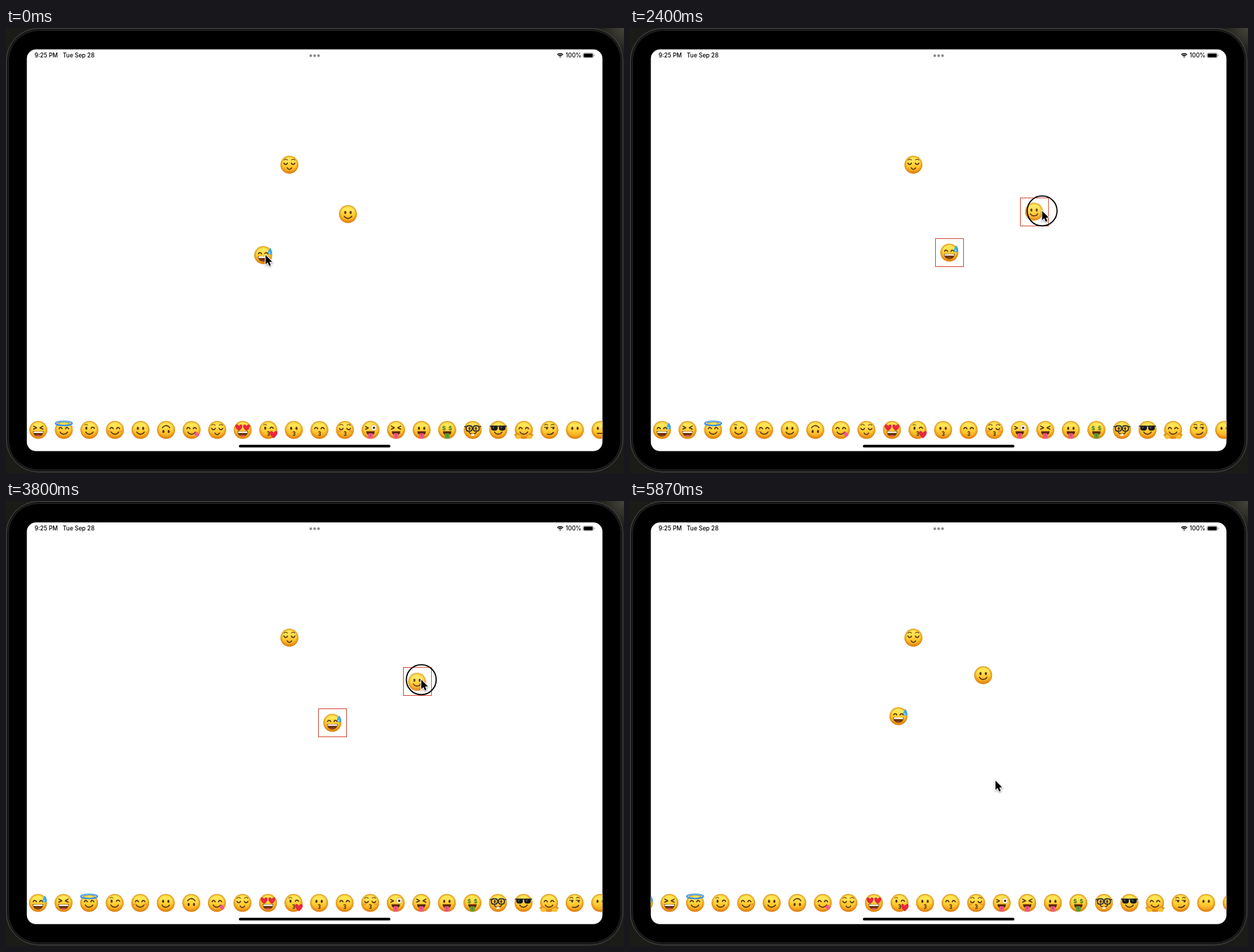
An HTML page with a canvas for the animation above (5940 ms loop, 881 by 635 pixels).

```html
<!DOCTYPE html>
<html lang="en">
<head>
<meta charset="utf-8">
<title>Emoji board</title>
<style>
html, body { margin: 0; width: 100%; height: 100%; overflow: hidden; background: #1b1b18; }
canvas { display: block; width: 881px; height: 635px; }
</style>
</head>
<body>
<canvas id="stage"></canvas>
<script>
const W = 881, H = 635, LOOP = 5940, STEP = 200 / 3;
const canvas = document.getElementById('stage');
const dpr = window.devicePixelRatio || 1;
canvas.width = W * dpr;
canvas.height = H * dpr;
const c = canvas.getContext('2d');
const PI = Math.PI, TAU = PI * 2;
const BROWN = '#5a2f08', BROW = '#7a430c', PINK = '#f2598f', RED = '#e8283c';

// ---------- drawing helpers ----------
function fill(color) { c.fillStyle = color; c.fill(); }
function stroke(color, width) { c.strokeStyle = color; c.lineWidth = width; c.stroke(); }
function oval(x, y, rx, ry, color) {
  c.beginPath();
  c.ellipse(x, y, rx, ry, 0, 0, TAU);
  fill(color);
}
function bow(x, y, r, from, to, width = 1.2, color = BROWN) {
  c.beginPath();
  c.arc(x, y, r, from * PI, to * PI);
  stroke(color, width);
}
function poly(points, color, width) {
  c.beginPath();
  points.forEach(([x, y]) => c.lineTo(x, y));
  if (width) stroke(color, width);
  else { c.closePath(); fill(color); }
}
function round(x, y, w, h, r) {
  c.beginPath();
  c.roundRect(x, y, w, h, r);
}
function at(x, y, scale, draw) {
  c.save();
  c.translate(x, y);
  c.scale(scale, scale);
  draw();
  c.restore();
}
function heart(x, y, s) {
  at(x, y, s, () => {
    c.beginPath();
    c.moveTo(0, 1);
    c.bezierCurveTo(-1.6, -0.1, -1.1, -1.3, -0.5, -1);
    c.quadraticCurveTo(-0.1, -0.9, 0, -0.5);
    c.quadraticCurveTo(0.1, -0.9, 0.5, -1);
    c.bezierCurveTo(1.1, -1.3, 1.6, -0.1, 0, 1);
    fill(RED);
  });
}

// ---------- face parts, for a head of radius 10 ----------
function head() {
  const g = c.createLinearGradient(0, -10, 0, 10);
  g.addColorStop(0, '#fde04a');
  g.addColorStop(0.25, '#ffe758');
  g.addColorStop(0.6, '#ffc92f');
  g.addColorStop(1, '#f2961a');
  oval(0, 0, 10, 10, g);
  const rim = c.createRadialGradient(0, -0.8, 7, 0, 0, 10);
  rim.addColorStop(0, 'rgba(214,118,10,0)');
  rim.addColorStop(1, 'rgba(206,112,10,.7)');
  oval(0, 0, 10, 10, rim);
}
const pair = draw => () => { draw(-3.6); draw(3.6); };
const dots = pair(x => oval(x * 0.83, -1.8, 1.15, 1.75, BROWN));
const happy = pair(x => bow(x, -0.8, 1.8, 1.08, 1.92));
const closed = pair(x => {
  bow(x * 1.15, -2.4, 2.1, 0.1, 0.9);
  bow(x * 1.15, -3.6, 2.5, 1.22, 1.78, 0.9, BROW);
});
const squint = pair(x => {
  const s = Math.sign(x);
  poly([[x + s * 1.7, -4.2], [x - s * 1.7, -2.4], [x + s * 1.7, -0.8]], BROWN, 1.2);
});
function wink() {
  oval(-3.4, -1.9, 1.15, 1.75, BROWN);
  bow(3.8, -1.2, 1.9, 1.1, 1.9);
  bow(-3.6, -4.1, 2, 1.2, 1.8, 0.8, BROW);
}
const heartEyes = pair(x => heart(x * 1.2, -2.4, 3.6));
const sideEyes = pair(x => {
  oval(x + 0.3, -1.9, 1.8, 1.1, '#fff0c4');
  oval(x + 0.8, -1.8, 1.1, 1.2, BROWN);
  poly([[x - 1.9, -2.9], [x + 2.1, -2.9]], BROWN, 1);
  bow(x, -3.4, 2.6, 1.25, 1.75, 0.8, BROW);
});
function wildEyes() {
  poly([[-5.6, -3.8], [-2.5, -2.2], [-5.5, -0.8]], BROWN, 1.2);
  oval(3.8, -2.4, 3.2, 3.2, '#ffffff');
  oval(3.8, -2.4, 1.4, 1.4, BROWN);
  bow(3.8, -2.4, 3.2, 0, 2, 0.5, '#c98a20');
}
const moneyEyes = pair(x => {
  c.fillStyle = '#3c7d1e';
  c.font = '700 6.4px Inter, Arial, sans-serif';
  c.textAlign = 'center';
  c.fillText('$', x, 0.2);
});
function glasses() {
  pair(x => {
    oval(x, -1.6, 1.2, 1.7, BROWN);
    round(x * 1.08 - 3.3, -4.6, 6.6, 6, 2.4);
    stroke('#2c2b30', 1.3);
  })();
  poly([[-9, -3.8], [-7, -3.4]], '#2c2b30', 1.1);
  poly([[9, -3.8], [7, -3.4]], '#2c2b30', 1.1);
}
function shades() {
  pair(x => {
    round(x * 1.22 - 3.7, -4.6, 7.4, 5.4, [1, 1, 3, 3]);
    fill('#17181c');
    poly([[x * 1.22 - 2, -3.5], [x * 1.22 + 0.4, -3.5], [x * 1.22 - 1, -1]], '#50545c');
  })();
  poly([[-9.3, -4.3], [9.3, -4.3]], '#17181c', 1);
}

const smile = () => bow(0, 0.1, 4.7, 0.16, 0.84);
const small = () => bow(0, 2.5, 2.7, 0.13, 0.87);
const kiss = () => {
  bow(0.1, 3.1, 1.1, 1.2, 2.5, 0.9);
  bow(0.1, 5.2, 1.1, 1.5, 2.8, 0.9);
};
const line = () => poly([[-3.5, 4], [3.5, 4]], BROWN, 1.2);
const smirkLip = () => {
  c.beginPath();
  c.moveTo(-2.4, 4.8);
  c.quadraticCurveTo(2.4, 5.8, 4.6, 2.8);
  stroke(BROWN, 1.2);
};
function open(lower) {
  c.save();
  c.beginPath();
  c.moveTo(-6, 1.2);
  c.quadraticCurveTo(0, 2, 6, 1.2);
  c.bezierCurveTo(6, 9.4, -6, 9.4, -6, 1.2);
  c.closePath();
  fill('#6b3208');
  c.clip();
  if (lower) oval(0, 8, 3.4, 2.4, lower);
  c.fillStyle = '#ffffff';
  c.fillRect(-5.3, 1.7, 10.6, 1.7);
  c.restore();
}
const laugh = () => open('#e8556a');
const grin = () => open('#8d4a12');
function tongue(color = PINK) {
  c.beginPath();
  c.arc(0, 1.6, 4.8, 0, PI);
  fill('#5d2508');
  round(-2.7, 3.7, 5.4, 6.2, [1.5, 1.5, 2.7, 2.7]);
  fill(color);
  poly([[0, 4.5], [0, 7.4]], 'rgba(90,20,40,.45)', 0.6);
}
const greenTongue = () => tongue('#55a532');

function drop() {
  c.beginPath();
  c.moveTo(7.8, -8.2);
  c.bezierCurveTo(11.4, -2.6, 10.3, -0.4, 7.6, -0.5);
  c.bezierCurveTo(4.2, -0.6, 4.4, -3.4, 7.8, -8.2);
  fill('#3ea6e6');
  oval(7, -2.3, 0.8, 1.1, '#a9dcfa');
}
function halo() {
  c.beginPath();
  c.ellipse(0, -7.2, 9.2, 2.3, 0, 0, TAU);
  stroke('#3d8ede', 1.7);
  c.beginPath();
  c.ellipse(0, -7.6, 9, 2, 0, 1.1 * PI, 1.9 * PI);
  stroke('#86c3f5', 0.7);
}
const blush = pair(x => oval(x * 1.75, 1.6, 2, 1.4, 'rgba(240,95,60,.4)'));
function lick() {
  at(4.8, 3.8, 1, () => {
    c.rotate(-0.7);
    round(-2.1, -1.2, 4.2, 5.4, 2);
    fill(PINK);
  });
}
const blownHeart = () => heart(6, 5.4, 4);
const teeth = () => {
  c.fillStyle = '#ffffff';
  c.fillRect(-1.7, 4.6, 3.4, 2);
};
function hands() {
  [-1, 1].forEach(s => {
    for (let i = 0; i < 4; i++) {
      const a = -0.5 + i * 0.42;
      poly([[s * 6.2, 8], [s * (6.2 - 4 * Math.sin(a - 0.6)), 8.2 - 3.6 * Math.cos(a - 0.3)]], '#e39a22', 1.8);
    }
    oval(s * 6.4, 7.6, 3.2, 2.6, '#f9bf35');
    bow(s * 6.4, 7.6, 2.9, 1.1, 1.9, 0.6, '#c87814');
  });
}

// eyes, mouth, extras; order as in the tray
const faces = [
  [happy, grin, drop], [squint, laugh], [happy, smile, halo], [wink, smile],
  [happy, smile, blush], [dots, smile], [dots, smile], [happy, smile, lick],
  [closed, small], [heartEyes, laugh], [wink, kiss, blownHeart], [dots, kiss],
  [happy, kiss], [closed, kiss, blush], [wildEyes, tongue], [squint, tongue],
  [dots, tongue], [moneyEyes, greenTongue], [glasses, smile, teeth], [shades, smile],
  [happy, smile, hands], [sideEyes, smirkLip], [dots], [dots, line]
];
const SWEAT = 0, SLIGHT = 5, FLIPPED = 6, RELIEVED = 8;

function face(id, x, y) {
  at(x, y, 1.275, () => {
    c.lineCap = c.lineJoin = 'round';
    head();
    if (id === FLIPPED) c.rotate(PI);
    faces[id].forEach(part => part());
  });
}

// ---------- motion ----------
// time, pointer x, pointer y, grip offset x, grip offset y
const path = [
  [0, 370, 324, 2, 2], [300, 370, 324, 2, 2], [667, 484, 285, 2, 2],
  [950, 490, 268, 2.5, 2.5], [1780, 490, 268, 2.5, 2.5], [2080, 525, 278, 8, 4],
  [2400, 587.5, 261, 11.5, -1], [2660, 642, 190, 6, -3], [2850, 575, 150, 1, 1],
  [3030, 465, 190, 0, 8], [3267, 384.5, 325.5, 9.5, 11.5], [3530, 490, 392, 12, 4],
  [3800, 592, 255, 6, -3], [4050, 505, 146, 1, 3], [4333, 398, 298, 6, 7],
  [4600, 440, 348, 8, 5], [4900, 512, 255, 8.5, 6.5], [5040, 512, 255, 8.5, 6.5],
  [5400, 535, 377, 8.5, 6.5], [5530, 521, 399, 8.5, 6.5], [5940, 521, 399, 8.5, 6.5]
];
function slope(i, k) {
  const a = path[i - 1], b = path[i], d = path[i + 1];
  if (!a || !d || (b[k] - a[k]) * (d[k] - b[k]) <= 0) return 0;
  return (d[k] - a[k]) / (d[0] - a[0]);
}
function pose(t) {
  let i = 0;
  while (i < path.length - 2 && t >= path[i + 1][0]) i++;
  const p = path[i], q = path[i + 1], span = q[0] - p[0];
  const u = (t - p[0]) / span, u2 = u * u, u3 = u2 * u;
  return [1, 2, 3, 4].map(k =>
    (2 * u3 - 3 * u2 + 1) * p[k] + (u3 - 2 * u2 + u) * span * slope(i, k) +
    (3 * u2 - 2 * u3) * q[k] + (u3 - u2) * span * slope(i + 1, k));
}
function ease(t, start, length) {
  const u = Math.min(1, Math.max(0, (t - start) / length));
  return u * u * (3 - 2 * u);
}
const within = (t, a, b) => t >= a && t < b;

const PICK_A = 250, PICK_B = 1400, GRAB = 1780, DROP = 4900, CLEAR = 5640;
const touches = [[130, 255], [1290, 1400], [1700, 4960], [5530, 5640]];

// ---------- scene ----------
function device() {
  c.fillStyle = '#1b1b18';
  c.fillRect(0, 0, W, H);
  const g = c.createRadialGradient(W, 0, 0, W, 0, 40);
  g.addColorStop(0, '#45453b');
  g.addColorStop(1, '#1b1b18');
  c.fillStyle = g;
  c.fillRect(W - 40, 0, 40, 40);
  round(0.5, 0.5, 879, 633, 46);
  fill('#161616');
  stroke('#4b4b4b', 1);
  round(3.5, 3.5, 873, 627, 43);
  fill('#000000');
  stroke('#262626', 1);
  screen();
  fill('#ffffff');
}
function screen() { round(29.7, 30.6, 820.6, 573.2, 13); }
function statusBar() {
  c.fillStyle = '#000000';
  c.font = '500 8.4px Inter, Arial, sans-serif';
  c.textAlign = 'left';
  c.fillText('9:25 PM', 40.7, 42);
  c.fillText('Tue Sep 28', 81, 42);
  c.fillText('100%', 797.8, 42);
  for (let i = -1; i <= 1; i++) oval(440 + i * 5.5, 39.5, 1.9, 1.9, '#8b8b8f');

  c.lineCap = 'butt';
  bow(790, 42.3, 5.8, 1.25, 1.75, 1.5, '#000000');
  bow(790, 42.3, 3.5, 1.25, 1.75, 1.4, '#000000');
  c.beginPath();
  c.moveTo(790, 42.6);
  c.arc(790, 42.3, 1.7, 1.25 * PI, 1.75 * PI);
  fill('#000000');

  round(822.5, 35.6, 15, 7, 2);
  stroke('#9a9a9a', 0.7);
  round(823.5, 36.5, 13, 5.2, 1.3);
  fill('#000000');
  round(838.4, 37.9, 1, 2.4, 0.5);
  fill('#9a9a9a');
}
function tray(shift) {
  c.save();
  screen();
  c.clip();
  faces.forEach((_, i) => face(i, 9.6 + shift + i * 36.43, 573.5));
  c.restore();
  round(332, 594.8, 216, 3.8, 1.9);
  fill('#000000');
}
function item(id, x, y, picked) {
  face(id, x, y);
  if (!picked) return;
  c.strokeStyle = '#d4513f';
  c.lineWidth = 1;
  c.strokeRect(Math.floor(x - 20) + 0.5, Math.floor(y - 20) + 0.5, 40, 40);
}
function pointer(x, y, pressed) {
  if (pressed) {
    c.beginPath();
    c.arc(x, y, 21.3, 0, TAU);
    fill('rgba(255,255,255,.08)');
    stroke('#000000', 1.7);
  }
  at(x, y, 0.95, () => {
    c.beginPath();
    [[0, 0], [0, 14], [3.2, 11.1], [5.5, 16.2], [7.9, 15.2], [5.7, 10.2], [10, 10]]
      .forEach(([px, py]) => c.lineTo(px, py));
    c.closePath();
    c.save();
    c.shadowColor = 'rgba(0,0,0,.4)';
    c.shadowBlur = 2.5 * dpr;
    c.shadowOffsetY = dpr;
    stroke('#ffffff', 2);
    c.restore();
    fill('#000000');
  });
}

function draw(t) {
  c.setTransform(dpr, 0, 0, dpr, 0, 0);
  const [px, py] = pose(t);
  const [gx, gy, ox, oy] = pose(Math.min(DROP, Math.max(GRAB, t)));
  const x = gx - ox, y = gy - oy;
  device();
  statusBar();
  tray(36 * (ease(t, PICK_A, 330) - ease(t, CLEAR, 350)));
  item(RELIEVED, 404, 195, false);
  item(SLIGHT, x, y, within(t, PICK_B, CLEAR));
  item(SWEAT, x - 120.8, y + 58.4, within(t, PICK_A, CLEAR));
  pointer(px, py, touches.some(([a, b]) => within(t, a, b)));
}

const begin = performance.now();
function tick() {
  const t = (performance.now() - begin) % LOOP;
  draw(Math.floor((t + 4) / STEP) * STEP);
  requestAnimationFrame(tick);
}
tick();
</script>
</body>
</html>
```
